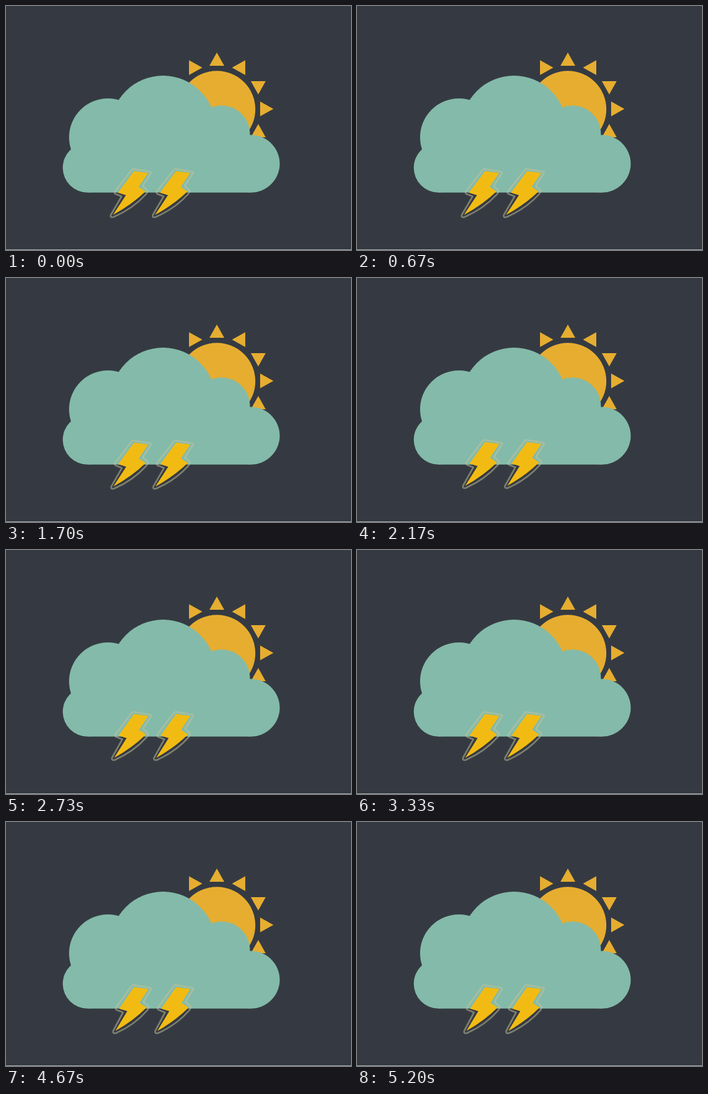
Write an HTML page that moves like this. It is 558 px wide and 396 px high and loops after 5230 ms.

```html
<!DOCTYPE html>
<html lang="en">
<head>
<meta charset="utf-8">
<title>Thundercloud</title>
<style>
  html, body { margin: 0; width: 100%; height: 100%; overflow: hidden; background: #353a42; }
  svg { display: block; width: 558px; height: 396px; }
</style>
</head>
<body>
<svg viewBox="0 0 558 396">
  <defs>
    <g id="bolt">
      <path d="M206.500 264.500L233 269Q235.500 270 234 272L221 292L228.500 299Q230 301.500 226 306Q205 329 174 342.500Q168 344 169.500 339L187 309L177 305Q174.500 304 176 301L203 266.500Q204.500 264.300 206.500 264.500Z"
        fill="none" stroke="#c8c6a0" stroke-opacity=".5" stroke-width="2.6" stroke-linejoin="round"/>
      <path d="M207 268L230 271L214.500 293.500L225.500 301Q204 322 173 339L194 307L181 303Z" fill="#f2bb13"/>
    </g>
  </defs>
  <rect width="558" height="396" fill="#353a42"/>
  <rect y="395" width="558" height="1" fill="#a8b0b0"/>
  <g fill="#e6ad30">
    <circle cx="341" cy="167.500" r="62.300"/>
    <path d="M341 75.500L353 97H329Z M296 88L317.500 100L296 112Z M387 88V112L365.500 100Z
      M396 122H420L408 143.500Z M411 155L432.500 167L411 179Z M408 191.500L420 213H396Z"/>
  </g>
  <g fill="#84baa9">
    <circle cx="132" cy="262.500" r="40.200"/>
    <circle cx="165" cy="213" r="63"/>
    <circle cx="254" cy="198" r="85"/>
    <circle cx="348.500" cy="207.500" r="46"/>
    <circle cx="396" cy="256" r="46.700"/>
    <path d="M132 225H396V302.700H132Z"/>
  </g>
  <g id="bolts">
    <use href="#bolt"/>
    <use href="#bolt" x="68"/>
  </g>
</svg>
<script>
  const LOOP = 5230;
  const BOLT_TOP = 268;
  const bolts = document.getElementById("bolts");

  // Each pose: time in ms, sideways lean, vertical shift.
  const poses = [
    [0, 0, 0], [1400, 0, 0],
    [2100, 0.028, -1.8], [3400, 0.028, -1.8],
    [4100, 0.055, 0], [LOOP, 0.055, 0]
  ];

  const ease = p => p * p * (3 - 2 * p);
  const mix = (from, to, p) => from + (to - from) * p;

  function render(time) {
    const next = poses.findIndex(pose => pose[0] > time);
    const [start, lean0, lift0] = poses[next - 1];
    const [end, lean1, lift1] = poses[next];
    const p = ease((time - start) / (end - start));
    const lean = mix(lean0, lean1, p);
    const lift = mix(lift0, lift1, p);
    bolts.setAttribute("transform", `matrix(1 0 ${lean} 1 ${-lean * BOLT_TOP} ${lift})`);
  }

  const origin = performance.now();
  function tick() {
    render((performance.now() - origin) % LOOP);
    requestAnimationFrame(tick);
  }
  tick();
</script>
</body>
</html>
```
